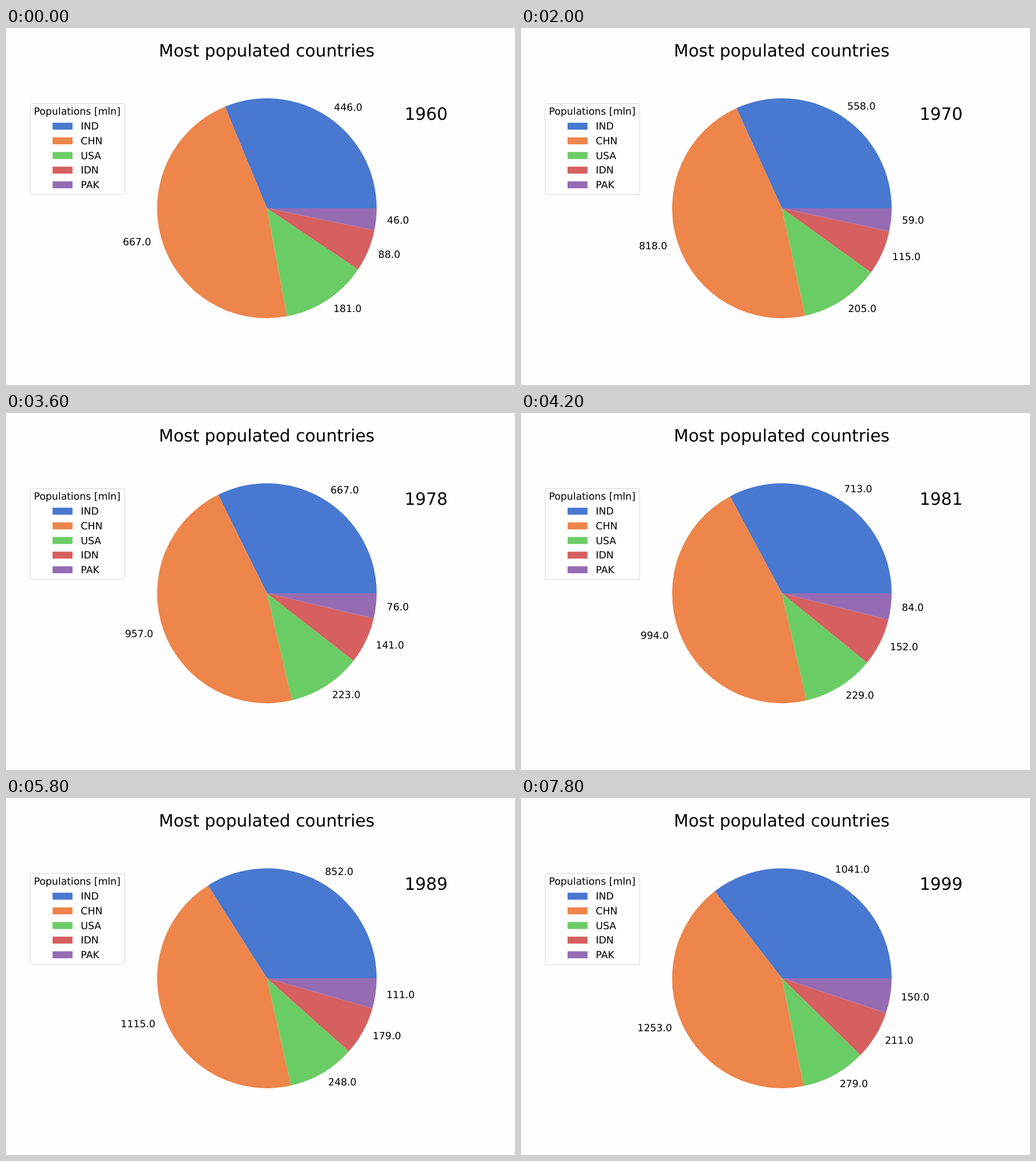
Animation, 894 px wide and 626 px high, one loop 8000 ms. Source, as an HTML page:

```html
<!DOCTYPE html>
<html lang="en">
<head>
<meta charset="utf-8">
<title>Most populated countries</title>
<style>
  html, body { margin: 0; width: 100%; height: 100%; overflow: hidden; background: #fefefe; }
  svg { display: block; width: 894px; height: 626px; }
  text { font: 17.38px "DejaVu Sans", sans-serif; text-rendering: geometricPrecision; }
  .big { font-size: 29.8px; }
</style>
</head>
<body>
<svg id="chart" viewBox="0 0 894 626"></svg>
<script>
const STEP = 200, YEARS = 40, FIRST = 1960;
const CX = 458.2, CY = 316.1, R = 192.8;

// Key populations in millions, at these years after FIRST.
const KEYS = [0, 2, 5, 10, 14, 21, 25, 33, 39];
const countries = [
  { code: 'IND', color: '#4878d0', points: [446, 467, 500.1, 557.5, 609.7, 712.9, 780.2, 926.4, 1040.6] },
  { code: 'CHN', color: '#ee854a', points: [667, 665.8, 715.2, 818.3, 900.3, 993.9, 1051, 1178.4, 1252.7] },
  { code: 'USA', color: '#6acc64', points: [180.7, 186.6, 194.3, 205, 213.9, 229.4, 237.9, 259.9, 279] },
  { code: 'IDN', color: '#d65f5f', points: [88.3, 93.1, 100.9, 115.2, 127.9, 151.7, 165.8, 191.8, 211] },
  { code: 'PAK', color: '#956cb4', points: [46, 48.2, 52, 59.2, 66, 84.3, 97.1, 126, 149.8] }
];

const svg = document.getElementById('chart');

function add(tag, attrs, text) {
  const el = document.createElementNS(svg.namespaceURI, tag);
  setAttrs(el, attrs);
  if (text) el.textContent = text;
  return svg.appendChild(el);
}

function setAttrs(el, attrs) {
  for (const k in attrs) el.setAttribute(k, attrs[k]);
}

// Cubic through the four nearest keys, rounded to whole millions.
function population(points, year) {
  const next = KEYS.findIndex(k => k > year);
  const first = Math.min(Math.max((next < 0 ? KEYS.length : next) - 2, 0), KEYS.length - 4);
  let sum = 0;
  for (let i = first; i < first + 4; i++) {
    let term = points[i];
    for (let j = first; j < first + 4; j++) {
      if (j !== i) term *= (year - KEYS[j]) / (KEYS[i] - KEYS[j]);
    }
    sum += term;
  }
  return Math.round(sum);
}

const polar = (turn, r) => {
  const a = turn * 2 * Math.PI;
  return [CX + r * Math.cos(a), CY - r * Math.sin(a)];
};

add('text', { class: 'big', x: 457.9, y: 50.2, 'text-anchor': 'middle' }, 'Most populated countries');
const yearText = add('text', { class: 'big', x: 699.9, y: 161 });

add('rect', { x: 42.5, y: 132.5, width: 166, height: 159.5, rx: 3.5, fill: '#fff', stroke: '#d6d6d6' });
add('text', { x: 49.1, y: 152 }, 'Populations [mln]');
countries.forEach((c, i) => {
  const y = 166.1 + i * 25.68;
  add('rect', { x: 81.8, y, width: 35, height: 12.2, fill: c.color });
  add('text', { x: 131.3, y: y + 12.1 }, c.code);
  c.wedge = add('path', { fill: c.color });
  c.label = add('text', {});
});

function draw(year) {
  yearText.textContent = FIRST + year;
  const values = countries.map(c => population(c.points, year));
  const total = values.reduce((a, b) => a + b);
  let turn = 0;
  countries.forEach((c, i) => {
    const share = values[i] / total;
    const [x0, y0] = polar(turn, R), [x1, y1] = polar(turn + share, R);
    const [x, y] = polar(turn + share / 2, R * 1.1);
    setAttrs(c.wedge, { d: `M${CX} ${CY}L${x0} ${y0}A${R} ${R} 0 0 0 ${x1} ${y1}Z` });
    setAttrs(c.label, { x, y: y + 5, 'text-anchor': x > CX ? 'start' : 'end' });
    c.label.textContent = values[i].toFixed(1);
    turn += share;
  });
}

const start = performance.now();
let shown = -1;
function tick() {
  const year = Math.floor(Math.max(0, performance.now() - start) / STEP) % YEARS;
  if (year !== shown) draw(shown = year);
  requestAnimationFrame(tick);
}
tick();
</script>
</body>
</html>
```
